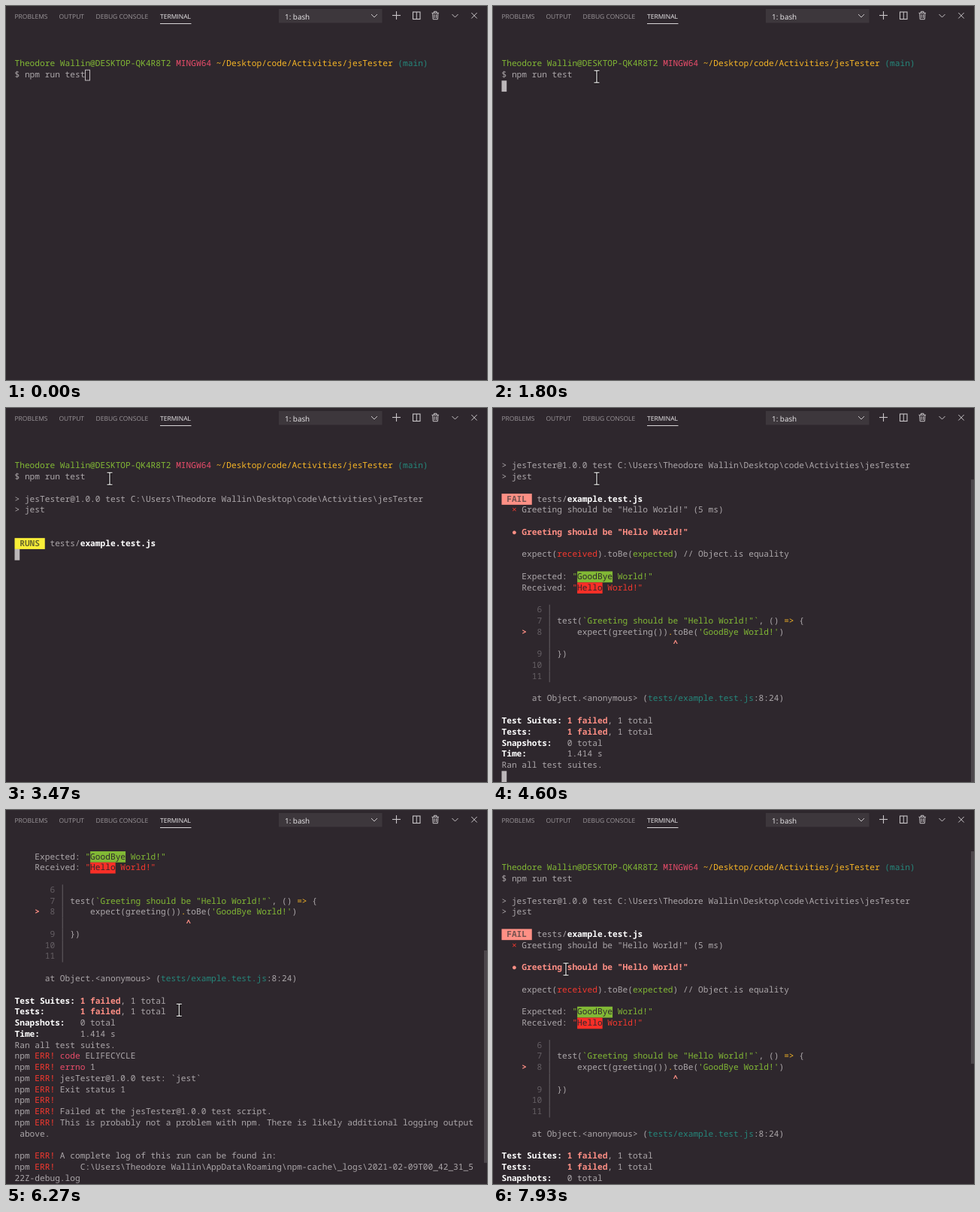
Write an HTML page with a canvas that moves like this. It is 640 px wide and 498 px high and loops after 8 s.

```html
<!DOCTYPE html>
<html lang="en">
<head>
<meta charset="utf-8">
<title>Terminal test run</title>
<style>
html, body { margin: 0; width: 100%; height: 100%; overflow: hidden; background: #2e272d; }
canvas { display: block; }
</style>
</head>
<body>
<canvas id="stage" width="640" height="498"></canvas>
<script>
const ctx = document.getElementById('stage').getContext('2d');
ctx.textRendering = 'geometricPrecision';

const LOOP = 8000;
const BG = '#2e272d';
const LEFT = 11.5, TOP = 55, CELL = 6.708, ROW = 14.77, ROWS = 30;
const MONO = '"Noto Sans Mono", "DejaVu Sans Mono", monospace';
const SANS = '"Open Sans", "Noto Sans", sans-serif';

// style: [colour, weight, background]
const STYLES = {
  n: ['#aca7aa', 400],
  d: ['#655f64', 400],
  w: ['#ffffff', 700],
  g: ['#82b935', 400],
  r: ['#f6392f', 400],
  s: ['#ff8f85', 700],
  p: ['#ea4d6b', 500],
  y: ['#f7b626', 500],
  t: ['#25877b', 400],
  F: ['#735250', 700, '#ff9085'],
  R: ['#6b692c', 700, '#f8ee38'],
  G: ['#2e272d', 400, '#82b935'],
  X: ['#2e272d', 400, '#f92f27']
};

const USER = 'Theodore Wallin';
const PROMPT = ['g', USER + '@DESKTOP-QK4R8T2 ', 'p', 'MINGW64 ',
  'y', '~/Desktop/code/Activities/jesTester ', 't', '(main)'];
const NONE = [];
const text = s => ['n', s];
const gutter = (num, ...rest) => ['d', String(num).padStart(8) + ' │ ', ...rest];
const err = (...rest) => ['n', 'npm ', 'r', 'ERR! ', ...rest];
const total = (label, ...rest) => ['w', label.padEnd(13), ...rest];
const failed = label => total(label, 's', '1 failed', 'n', ', 1 total');

const START = [
  NONE, PROMPT, text('$ npm run test'), NONE,
  text('> jesTester@1.0.0 test C:\\Users\\' + USER + '\\Desktop\\code\\Activities\\jesTester'),
  text('> jest'), NONE
];
const FILE = ['n', ' tests/', 'w', 'example.test.js'];
const RUNNING = [...START, NONE, ['R', ' RUNS ', ...FILE]];
const REPORT = [
  ...START,
  ['F', ' FAIL ', ...FILE],
  ['r', '  × ', 'n', 'Greeting should be "Hello World!" (5 ms)'],
  NONE,
  ['s', '  ● Greeting should be "Hello World!"'],
  NONE,
  ['n', '    expect(', 'r', 'received', 'n', ').toBe(', 'g', 'expected', 'n', ') // Object.is equality'],
  NONE,
  ['n', '    Expected: ', 'g', '"', 'G', 'GoodBye', 'g', ' World!"'],
  ['n', '    Received: ', 'r', '"', 'X', 'Hello', 'r', ' World!"'],
  NONE,
  gutter(6),
  gutter(7, 'n', 'test(', 'g', '`Greeting should be "Hello World!"`', 'n', ', () ', 'y', '=>', 'n', ' {'),
  ['s', '    > ', 'd', ' 8 │ ', 'n', '    expect(greeting())', 'y', '.', 'n', 'toBe(',
    'g', "'GoodBye World!'", 'n', ')'],
  gutter('', 's', ' '.repeat(23) + '^'),
  gutter(9, 'n', '})'),
  gutter(10),
  gutter(11),
  NONE,
  ['n', '      at Object.<anonymous> (', 't', 'tests/example.test.js', 'n', ':8:24)'],
  NONE,
  failed('Test Suites:'),
  failed('Tests:'),
  total('Snapshots:', 'n', '0 total'),
  total('Time:', 'n', '1.414 s'),
  text('Ran all test suites.')
];
const FINISHED = [
  ...REPORT,
  err('p', 'code', 'n', ' ELIFECYCLE'),
  err('p', 'errno', 'n', ' 1'),
  err('n', 'jesTester@1.0.0 test: `jest`'),
  err('n', 'Exit status 1'),
  err(),
  err('n', 'Failed at the jesTester@1.0.0 test script.'),
  err('n', 'This is probably not a problem with npm. There is likely additional logging output'),
  text(' above.'),
  NONE,
  err('n', 'A complete log of this run can be found in:'),
  err('n', '    C:\\Users\\' + USER + '\\AppData\\Roaming\\npm-cache\\_logs\\2021-02-09T00_42_31_5'),
  text('22Z-debug.log'),
  NONE, PROMPT, text('$ ')
];

// Each phase: start time, visible log, cursor line and column
const PHASES = [
  [0, START.slice(0, 3), 2, 14],
  [1400, START.slice(0, 3), 3, 0],
  [2200, START, 7, 0],
  [3000, RUNNING, 9, 0],
  [4470, REPORT, 32, 0],
  [4950, FINISHED, 46, 2]
];
const FOCUS_AT = 900, SCROLL_AT = 6200, NOTCH = 90;

// Pointer keys: time, x, y
const POINTER = [
  [350, 644, 342], [850, 138, 94], [4680, 138, 94], [5230, 229, 269],
  [6130, 229, 269], [6900, 244, 239], [7000, 244, 239], [7900, 97, 212]
];

function rect(x, y, w, h, colour) {
  ctx.fillStyle = colour;
  ctx.fillRect(x, y, w, h);
}

function path(points, colour, width = 1) {
  ctx.strokeStyle = colour;
  ctx.lineWidth = width;
  ctx.beginPath();
  points.forEach(([x, y], i) => i ? ctx.lineTo(x, y) : ctx.moveTo(x, y));
  ctx.stroke();
}

function label(str, x, y, size, colour) {
  ctx.font = `${size}px ${SANS}`;
  ctx.fillStyle = colour;
  ctx.fillText(str, x, y);
}

function drawHeader() {
  label('PROBLEMS', 11.5, 16.5, 8.5, '#9b969a');
  label('OUTPUT', 70.5, 16.5, 8.5, '#9b969a');
  label('DEBUG CONSOLE', 119.5, 16.5, 8.5, '#9b969a');
  label('TERMINAL', 205, 16.5, 8.5, '#eeecee');
  rect(205, 23, 41.5, 1, '#d8d5d7');

  rect(363, 4, 137.5, 18.5, '#3d373c');
  label('1: bash', 371, 17.5, 9.9, '#eeecee');

  const c = '#c9c5c8';
  const chevron = x => path([[x - 4, 11], [x, 15], [x + 4, 11]], c);
  chevron(490);
  chevron(597.5);
  path([[514, 12.5], [525, 12.5]], c, 1.1);
  path([[519.5, 7], [519.5, 18]], c, 1.1);
  ctx.strokeRect(541.5, 8, 9.5, 9.5);
  path([[546.3, 8], [546.3, 17.5]], c);
  path([[566.5, 9.3], [576, 9.3]], c);
  path([[569.5, 9], [569.5, 7.3], [573, 7.3], [573, 9]], c);
  path([[567.7, 9.5], [568.2, 17.7], [574.3, 17.7], [574.8, 9.5]], c);
  path([[570, 11], [570, 16]], c);
  path([[572.5, 11], [572.5, 16]], c);
  path([[619.3, 9], [626.7, 16.5]], c);
  path([[626.7, 9], [619.3, 16.5]], c);
}

function drawLine(line, y) {
  let col = 0;
  for (let i = 0; i < line.length; i += 2) {
    const [colour, weight, back] = STYLES[line[i]];
    const str = line[i + 1];
    if (back) rect(LEFT + col * CELL, y, str.length * CELL, ROW, back);
    ctx.font = `${weight} 11.18px ${MONO}`;
    ctx.fillStyle = colour;
    for (const ch of str) {
      if (ch === '│') rect(LEFT + (col + 0.5) * CELL - 0.5, y, 1, ROW, colour);
      else if (ch !== ' ') ctx.fillText(ch, LEFT + col * CELL, y + 10.5);
      col++;
    }
  }
}

function drawTerminal(t) {
  const [, log, cursorLine, cursorCol] = PHASES.filter(p => p[0] <= t).pop();
  const count = cursorLine + 1;
  let top = Math.max(0, count - ROWS);
  if (t >= SCROLL_AT) top = Math.max(0, top - 3 * (1 + Math.floor((t - SCROLL_AT) / NOTCH)));

  log.slice(top, top + ROWS).forEach((line, i) => drawLine(line, TOP + i * ROW));

  if (cursorLine < top + ROWS) {
    const x = LEFT + cursorCol * CELL, y = TOP + (cursorLine - top) * ROW;
    if (t < FOCUS_AT) {
      ctx.strokeStyle = '#c1bcbf';
      ctx.lineWidth = 1;
      ctx.strokeRect(x + 0.1, y + 0.7, CELL - 0.7, ROW - 1);
    } else {
      rect(x, y, CELL, ROW, '#bcb7ba');
    }
  }
  if (count > ROWS) {
    const view = ROWS * ROW;
    rect(636, TOP + top / count * view, 4, ROWS / count * view, '#4d474c');
  }
}

function drawPointer(t) {
  if (t < POINTER[0][0]) return;
  let [, x, y] = POINTER[POINTER.length - 1];
  const next = POINTER.findIndex(k => k[0] > t);
  if (next > 0) {
    const [t0, x0, y0] = POINTER[next - 1], [t1, x1, y1] = POINTER[next];
    const u = (t - t0) / (t1 - t0), e = u * u * (3 - 2 * u);
    x = x0 + (x1 - x0) * e;
    y = y0 + (y1 - y0) * e;
  }
  for (const [colour, width] of [['#0c090b', 3.2], ['#f4f2f4', 1.2]]) {
    path([[x - 3.5, y - 8], [x + 3.5, y - 8]], colour, width);
    path([[x, y - 8], [x, y + 8]], colour, width);
    path([[x - 3.5, y + 8], [x + 3.5, y + 8]], colour, width);
  }
}

function frame(now) {
  const t = now % LOOP;
  rect(0, 0, 640, 498, BG);
  drawHeader();
  drawTerminal(t);
  drawPointer(t);
  requestAnimationFrame(frame);
}
requestAnimationFrame(frame);
</script>
</body>
</html>
```
